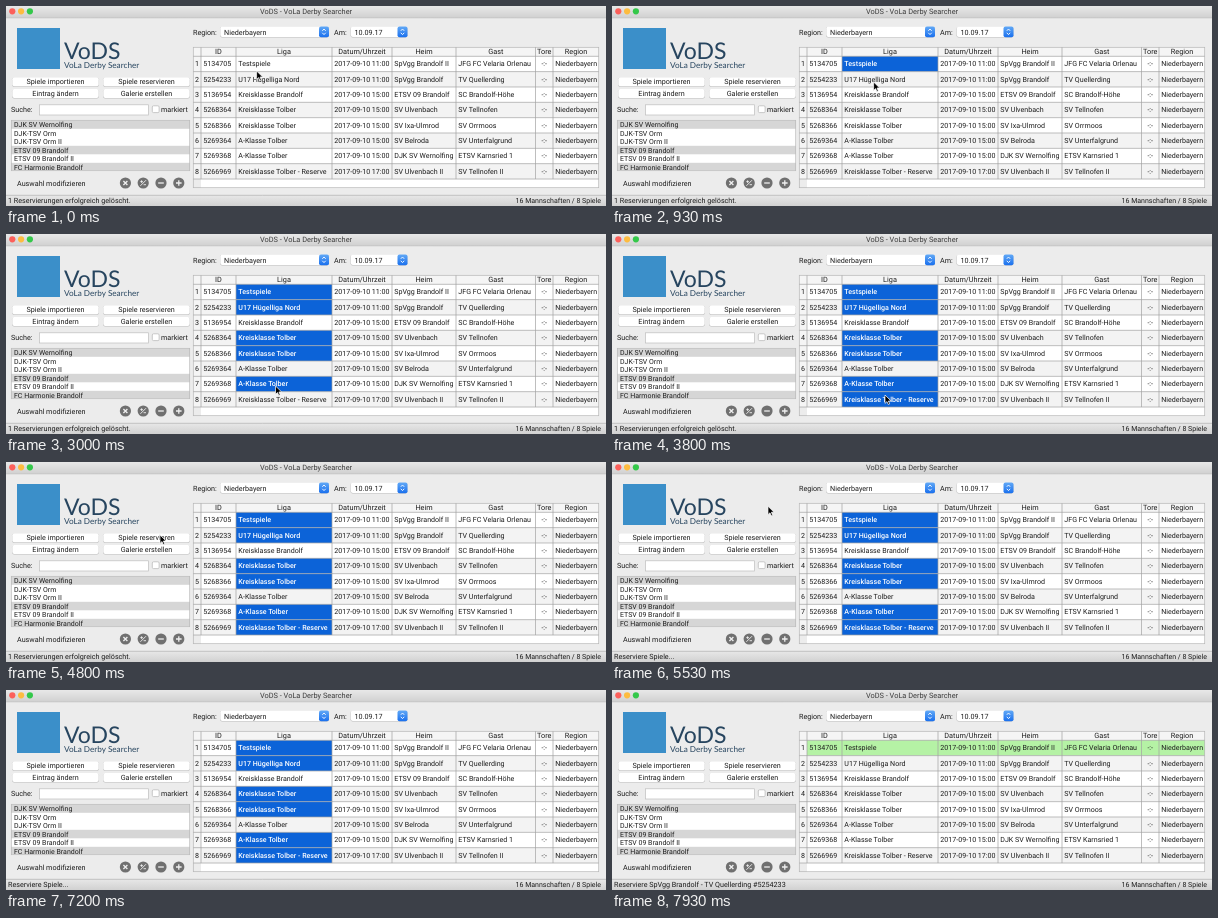
Recreate the animation shown at these times as an HTML page. Size 600 by 200 pixels, loop 8 s.

```html
<!DOCTYPE html>
<html lang="de">
<head>
<meta charset="utf-8">
<title>VoDS</title>
<style>
html, body { margin: 0; width: 100%; height: 100%; overflow: hidden; background: #ececec; }
svg { display: block; width: 600px; height: 200px; }
text { font-family: Roboto, "Open Sans", sans-serif; text-rendering: geometricPrecision; white-space: pre; }
</style>
</head>
<body>
<svg id="stage" viewBox="0 0 600 200">
  <defs>
    <linearGradient id="bar" x2="0" y2="1"><stop stop-color="#e8e8e8"/><stop offset="1" stop-color="#d1d1d1"/></linearGradient>
    <linearGradient id="blue" x2="0" y2="1"><stop stop-color="#62a9f6"/><stop offset="1" stop-color="#1a70ee"/></linearGradient>
    <clipPath id="listClip"><rect x="5" y="114" width="179" height="50.5"/></clipPath>
  </defs>
</svg>
<script>
const LOOP = 8000;
const stage = document.getElementById("stage");

function add(tag, attrs, parent = stage) {
  const node = document.createElementNS("http://www.w3.org/2000/svg", tag);
  for (const key in attrs) node.setAttribute(key, attrs[key]);
  return parent.appendChild(node);
}
const rect = (x, y, width, height, fill, more = {}, parent) =>
  add("rect", { x, y, width, height, fill, ...more }, parent);
const path = (d, stroke, width = 1, more = {}) =>
  add("path", { d, stroke, "stroke-width": width, fill: "none", ...more });
function label(content, x, y, size = 7.1, more = {}, parent) {
  const node = add("text", { x, y, "font-size": size, fill: "#1c1c1c", ...more }, parent);
  node.textContent = content;
  return node;
}
const centered = { "text-anchor": "middle" };

// Window frame
rect(0, 0, 600, 200, "#ececec");
rect(0, 0, 600, 11.5, "url(#bar)");
path("M0 11.8H600", "#bcbcbc", .8);
["#fc605b", "#fdbc40", "#34c84a"].forEach((fill, i) =>
  add("circle", { cx: 6.3 + 8.8 * i, cy: 5.3, r: 3.1, fill }));
label("VoDS - VoLa Derby Searcher", 300, 7.9, 7.4, { ...centered, fill: "#3c3c3c" });

// Brand
rect(11, 22, 43, 41, "#3b8fc9");
const brandFont = { style: "font-family: Lato, sans-serif", fill: "#27455f" };
label("VoDS", 58, 52.6, 23, brandFont);
label("VoLa Derby Searcher", 58, 62.3, 8.2, brandFont);

// Left controls
function button(content, x, y) {
  rect(x, y + .6, 87, 9.2, "#bdbdbd", { rx: 2 });
  rect(x + .3, y + .2, 86.4, 9, "#fff", { rx: 2 });
  label(content, x + 43.5, y + 7.4, 7.2, centered);
}
button("Spiele importieren", 6, 71);
button("Spiele reservieren", 97, 71);
button("Eintrag ändern", 6, 82.8);
button("Galerie erstellen", 97, 82.8);

label("Suche:", 5, 105.7, 7.2);
rect(33.5, 98.8, 109, 10.2, "#fff", { stroke: "#bebebe", "stroke-width": .7 });
rect(146.3, 99.8, 6.8, 6.8, "#fff", { rx: 1.2, stroke: "#b5b5b5", "stroke-width": .7 });
label("markiert", 155, 105.7, 7.2);

// Team list
rect(5, 114, 179, 50.8, "#fff");
const list = add("g", { "clip-path": "url(#listClip)" });
["DJK SV Wernolfing", "DJK-TSV Orm", "DJK-TSV Orm II", "ETSV 09 Brandolf",
 "ETSV 09 Brandolf II", "FC Harmonie Brandolf"].forEach((team, i) => {
  const y = 114.3 + 8.5 * i;
  if (i === 0 || i === 3 || i === 5) rect(5, y, 179, 8.5, "#d6d6d6", {}, list);
  label(team, 8, y + 6.7, 7, {}, list);
});
rect(5.3, 114.3, 178.4, 50.4, "none", { stroke: "#b9b9b9", "stroke-width": .7 });

label("Auswahl modifizieren", 11, 179.6, 7.2);
["M-2-2L2 2M2-2L-2 2", "M-2.8 2.8L2.8-2.8M-2.9-1.4H-.3M-1.6-2.7V-.1M.4 1.7H2.8", "M-2.8 0H2.8", "M-2.8 0H2.8M0-2.8V2.8"]
  .forEach((d, i) => {
    const cx = 119.4 + 17.8 * i;
    add("circle", { cx, cy: 177, r: 5.6, fill: "#707070" });
    path(d, "#f0f0f0", i === 1 ? .9 : 1.3, { transform: `translate(${cx} 177)` });
  });

// Filters
function combo(content, x, width) {
  const end = x + width;
  rect(x, 20.8, width, 10.6, "#bdbdbd", { rx: 2 });
  rect(x + .3, 20.5, width - .6, 10.4, "#fff", { rx: 2 });
  rect(end - 10, 20.4, 10, 10.8, "url(#blue)", { rx: 2 });
  path(`M${end - 6.7} 24.8l1.7-1.8 1.7 1.8m-3.4 2l1.7 1.8 1.7-1.8`, "#fff", .9);
  label(content, x + 4, 28.5, 7.2);
}
label("Region:", 187, 28.5, 7.2);
combo("Niederbayern", 214, 109);
label("Am:", 328, 28.5, 7.2);
combo("10.09.17", 344.5, 57);

// Match table
const edges = [187, 195, 230, 326, 386, 450, 529.5, 547, 593];
const top0 = 50.3, rowHeight = 15.34, bottom = top0 + 8 * rowHeight;
const matches = [
  ["5134705", "Testspiele", "11:00", "SpVgg Brandolf II", "JFG FC Velaria Orlenau"],
  ["5254233", "U17 Hügelliga Nord", "11:00", "SpVgg Brandolf", "TV Quellerding"],
  ["5136954", "Kreisklasse Brandolf", "15:00", "ETSV 09 Brandolf", "SC Brandolf-Höhe"],
  ["5268364", "Kreisklasse Tolber", "15:00", "SV Ulvenbach", "SV Tellnofen"],
  ["5268366", "Kreisklasse Tolber", "15:00", "SV Ixa-Ulmrod", "SV Orrmoos"],
  ["5269364", "A-Klasse Tolber", "15:00", "SV Belroda", "SV Unterfalgrund"],
  ["5269368", "A-Klasse Tolber", "15:00", "DJK SV Wernolfing", "ETSV Karnsried 1"],
  ["5266969", "Kreisklasse Tolber - Reserve", "17:00", "SV Ulvenbach II", "SV Tellnofen II"],
];
rect(187, 41, 406, 141, "#fff");
rect(187, 41, 406, top0 - 41, "#f5f5f5");
rect(187, top0, 8, bottom - top0, "#f5f5f5");
rect(187, bottom, 8, 182 - bottom, "#ececec");
["ID", "Liga", "Datum/Uhrzeit", "Heim", "Gast", "Tore", "Region"].forEach((name, i) =>
  label(name, (edges[i + 1] + edges[i + 2]) / 2, 48.1, 7.3, centered));

const rows = matches.map(([id, league, time, home, guest], i) => {
  const y = top0 + rowHeight * i, base = y + 9.9;
  const back = rect(195, y, 398, rowHeight, "#fff");
  const mark = rect(230, y, 96, rowHeight, "#0c63d8");
  label(i + 1, 191, base, 7.1, centered);
  const cells = [id, league, "2017-09-10 " + time, home, guest, "-:-", "Niederbayern"].map((content, c) =>
    c === 5 ? label(content, 538.2, base, 7.1, centered) : label(content, edges[c + 1] + 2.3, base));
  return { back, mark, league: cells[1], plain: i % 2 ? "#f3f3f3" : "#fff" };
});
for (let i = 0; i <= 8; i++) path(`M187 ${top0 + rowHeight * i}H593`, "#a3a3a3", .7);
edges.slice(1, -1).forEach(x => path(`M${x} 41V${bottom}`, "#a3a3a3", .7));
rect(187.3, 41.3, 405.4, 140.4, "none", { stroke: "#b5b5b5", "stroke-width": .7 });

// Status bar
rect(0, 189, 600, 11, "url(#bar)");
path("M0 189.3H600", "#b8b8b8", .8);
const status = label("", 2, 197.3, 7.2);
label("16 Mannschaften / 8 Spiele", 595, 197.3, 7, { "text-anchor": "end" });

const cursor = path("M0 0V8.4L2 6.6 3.3 9.5 4.7 8.9 3.4 6H6.1Z", "#fff", .7, { fill: "#000" });

// Timeline in ms
const selectedAt = [350, 1100, Infinity, 1600, 1950, Infinity, 2800, 3350];
const RESERVE = 5200, BOOKED = 7400;
const route = [
  [0, 250.6, 65], [350, 252, 62], [930, 261.6, 76], [1100, 261.6, 76], [1600, 263, 102],
  [1950, 264, 114], [2200, 264, 114], [2800, 268, 148], [3350, 273, 161], [3800, 273, 161],
  [4600, 154, 73], [5300, 154, 73], [5900, 160, -14], [LOOP, 160, -14],
];
function cursorAt(t) {
  const i = route.findIndex(point => point[0] > t);
  const [t0, x0, y0] = route[i - 1], [t1, x1, y1] = route[i];
  const p = (t - t0) / (t1 - t0), e = p * p * (3 - 2 * p);
  return [x0 + (x1 - x0) * e, y0 + (y1 - y0) * e];
}

function draw() {
  const t = performance.now() % LOOP;
  rows.forEach((row, i) => {
    const selected = t >= selectedAt[i] && t < BOOKED;
    row.mark.setAttribute("visibility", selected ? "visible" : "hidden");
    row.league.setAttribute("fill", selected ? "#fff" : "#1c1c1c");
    row.league.setAttribute("font-weight", selected ? 500 : 400);
    row.back.setAttribute("fill", i === 0 && t >= BOOKED ? "#b5f2a5" : row.plain);
  });
  status.textContent = t < RESERVE ? "1 Reservierungen erfolgreich gelöscht."
    : t < BOOKED ? "Reserviere Spiele..."
    : "Reserviere SpVgg Brandolf - TV Quellerding #5254233";
  cursor.setAttribute("transform", `translate(${cursorAt(t)})`);
  requestAnimationFrame(draw);
}
draw();
</script>
</body>
</html>
```
